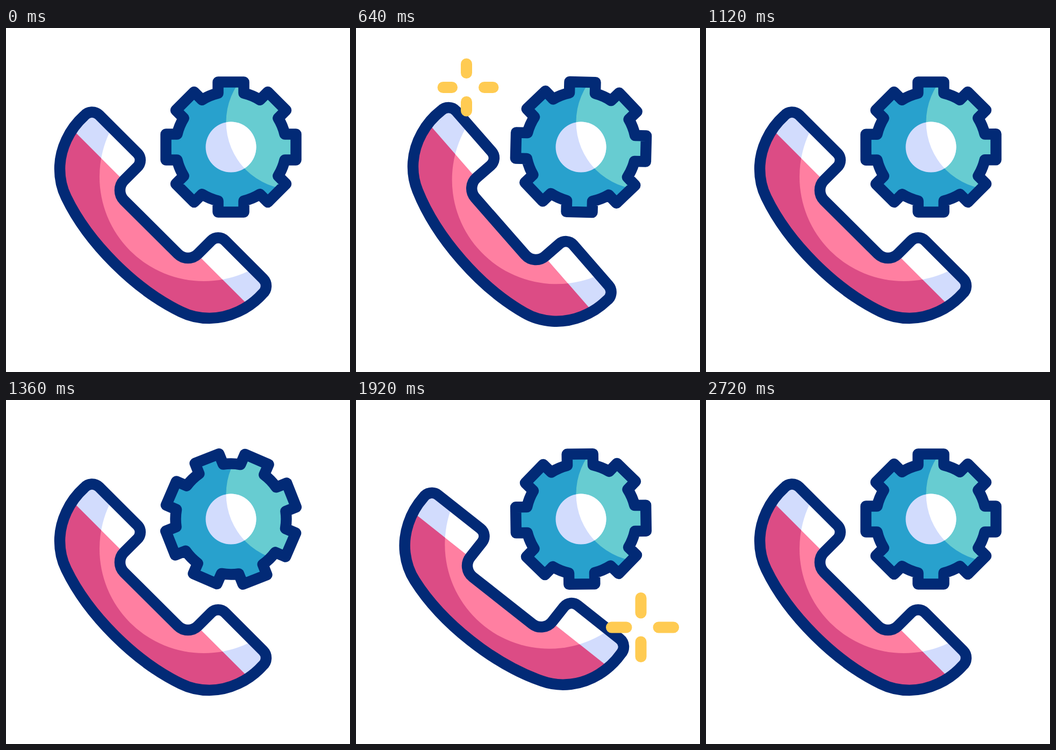
An HTML page that plays this animation: 640 px wide and 640 px high, repeating every 3 s.

```html
<!DOCTYPE html>
<html lang="en">
<head>
<meta charset="utf-8">
<title>Phone settings</title>
<style>
  html, body { margin: 0; width: 100%; height: 100%; overflow: hidden; background: #fff; }
  svg { display: block; width: 100vw; height: 100vh; }
  .line { fill: none; stroke: #022a76; stroke-width: 20.5; stroke-linejoin: round; }
  .spark { fill: none; stroke: #ffcb52; stroke-width: 21; stroke-linecap: round; }
</style>
</head>
<body>
<svg viewBox="0 0 640 640">
  <defs>
    <path id="phoneShape" d="M145.3,163.5 A19,19 0 0 1 173.4,162.1 L244.5,233 A18,18 0 0 1 244.5,258.5
      L219.7,283.3 A26.5,26.5 0 0 0 219.7,320.7 L319.8,420.3 A26.5,26.5 0 0 0 357.2,420.3
      L382,395.5 A18,18 0 0 1 407.5,395.5 L478.4,466.6 A19,19 0 0 1 477,494.7
      C452.5,522 415.5,540 378.5,540 C359.5,540 341.5,536 325.5,528
      C240.5,487 153,400 112,315 C104,299 100,281 100,262 C100,225 118,188 145.3,163.5Z"/>
    <clipPath id="phoneClip"><use href="#phoneShape"/></clipPath>
    <clipPath id="earClip"><path d="M0,65 L575,640 H640 V0 H0Z"/></clipPath>
    <clipPath id="gearClip"><path id="gearMask"/></clipPath>
    <clipPath id="hubClip"><circle cx="418.5" cy="221.5" r="47"/></clipPath>
  </defs>

  <g id="phone">
    <g clip-path="url(#phoneClip)">
      <rect width="640" height="640" fill="#dc4c85"/>
      <circle cx="368" cy="277" r="194" fill="#ff7fa1"/>
      <g clip-path="url(#earClip)">
        <rect width="640" height="640" fill="#d2dcfd"/>
        <circle cx="368" cy="277" r="194" fill="#fff"/>
      </g>
    </g>
    <use href="#phoneShape" class="line"/>
  </g>

  <g clip-path="url(#gearClip)">
    <rect x="280" y="80" width="280" height="280" fill="#28a1cd"/>
    <circle cx="535" cy="175" r="125.5" fill="#67ccd1"/>
  </g>
  <g clip-path="url(#hubClip)">
    <rect x="360" y="160" width="120" height="120" fill="#d2dcfd"/>
    <circle cx="535" cy="175" r="125.5" fill="#fff"/>
  </g>
  <path id="gear" class="line"/>

  <path id="sparkA" class="spark"/>
  <path id="sparkB" class="spark"/>
</svg>
<script>
  const LOOP = 3000, REST = 2720, STEP = 40;
  const $ = id => document.getElementById(id);
  const ramp = (t, start, length) => Math.max(0, Math.min(1, (t - start) / length));
  const ease = u => (1 - Math.cos(Math.PI * u)) / 2;

  // Eight flat teeth joined by arcs, centred on the origin
  function gearPath() {
    const half = 24, top = 121, root = 103, base = Math.sqrt(root * root - half * half);
    const corners = [[-half, -base], [-half, -top], [half, -top], [half, -base]];
    let d = '';
    for (let i = 0; i < 8; i++) {
      const a = i * Math.PI / 4, c = Math.cos(a), s = Math.sin(a);
      corners.forEach(([x, y], j) => {
        const cmd = j ? 'L' : i ? `A${root},${root} 0 0 1 ` : 'M';
        d += cmd + (x * c - y * s).toFixed(2) + ',' + (x * s + y * c).toFixed(2);
      });
    }
    return d + `A${root},${root} 0 0 1 ${-half},${-base.toFixed(2)}Z`;
  }

  // One ring: six quick swings to left and right, then back to rest
  const swings = [0, -7.2, 4.7, -7.2, 4.7, -7.2, 4.7, 0];
  function ring(t, start) {
    const u = (t - start) / 120, i = Math.floor(u);
    if (i < 0 || i >= swings.length - 1) return 0;
    return swings[i] + (swings[i + 1] - swings[i]) * (u - i);
  }
  const phoneAngle = t => ring(t, 152) + ring(t, 1566);

  const gearAngle = t => [12, 1284, 2546].reduce((sum, s) => sum - 360 * ramp(t, s, 1266), 0);

  // Four rays: the head runs outwards, then the tail follows
  function sparkPath(t, start, x, y) {
    const len = 27.7, grow = 300, lag = 320;
    if (t <= start || t >= start + lag + grow) return '';
    const head = len * ease(ramp(t, start, grow)) + 0.01;
    const tail = len * ease(ramp(t, start + lag, grow));
    const hx = x + 3;
    return [1, -1].map(s =>
      `M${x},${y + s * (27 + tail)}V${y + s * (27 + head)}` +
      `M${hx + s * (30 + tail)},${y}H${hx + s * (30 + head)}`).join('');
  }

  function draw(time) {
    const now = Math.floor(time % LOOP / STEP) * STEP;
    const t = now < REST ? now : 0;
    $('phone').setAttribute('transform', `rotate(${phoneAngle(t)} 292 348)`);
    const turn = `translate(418.5 221.5) rotate(${gearAngle(t)})`;
    $('gear').setAttribute('transform', turn);
    $('gearMask').setAttribute('transform', turn);
    $('sparkA').setAttribute('d', sparkPath(t, 472, 205.5, 110.5));
    $('sparkB').setAttribute('d', sparkPath(t, 1633, 530, 423));
  }

  const shape = gearPath();
  $('gear').setAttribute('d', shape);
  $('gearMask').setAttribute('d', shape);

  const begin = performance.now();
  function tick() {
    draw(performance.now() - begin);
    requestAnimationFrame(tick);
  }
  draw(0);
  requestAnimationFrame(tick);
</script>
</body>
</html>
```
